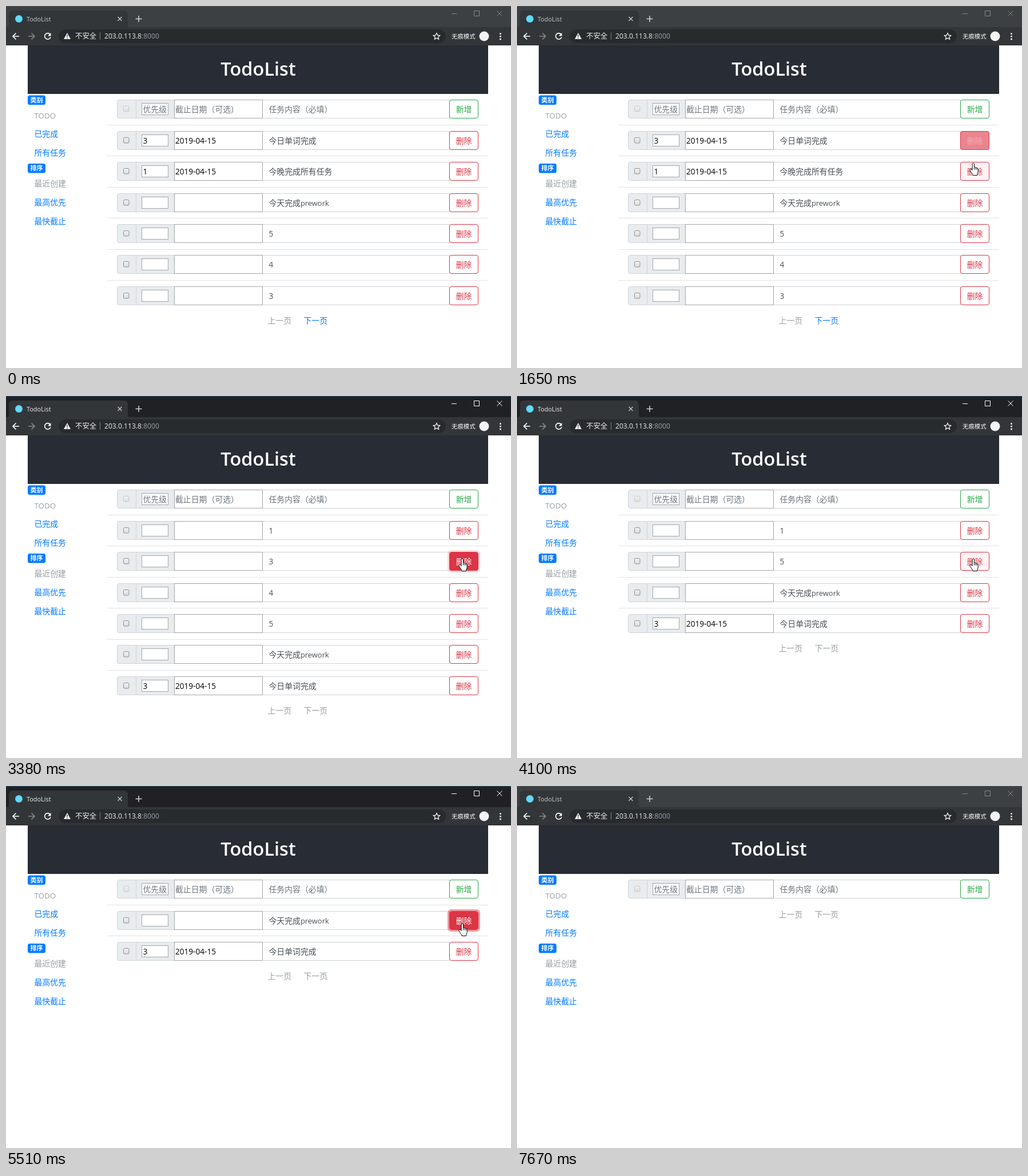
An HTML page for the animation above (7760 ms loop, 883 by 634 pixels).

```html
<!DOCTYPE html>
<html lang="zh-CN">
<head>
<meta charset="utf-8">
<title>TodoList</title>
<style>
html, body { margin: 0; width: 100%; height: 100%; overflow: hidden; background: #fff; }
svg { display: block; width: 100vw; height: 100vh; }
text { font: 13.87px "Open Sans", "Noto Sans CJK SC", "Noto Sans CJK", sans-serif; white-space: pre; }
.num { font-size: 13.6px; }
.word { font-size: 12.9px; }
.line { fill: none; stroke: #fff; }
.link { fill: #007bff; }
.off { fill: #979ea4; }
.hint { fill: #6c757d; }
.body { fill: #495057; }
.badge { font-size: 11px; font-weight: 700; fill: #fff; }
#bar { fill: #3c4043; }
#edge { fill: #4b5054; }
#tabName { font-size: 10.9px; fill: #c6c9cc; }
#controls { stroke: #85898c; }
.active #bar { fill: #202124; }
.active #edge { fill: #264a66; }
.active #tabName { fill: #eceef0; }
.active #controls { stroke: #fff; }
</style>
</head>
<body>
<svg id="stage" viewBox="0 0 883 634">
  <defs>
    <linearGradient id="box" x2="0" y2="1">
      <stop stop-color="#f3f3f3"/><stop offset="1" stop-color="#dcdcdc"/>
    </linearGradient>
  </defs>
  <rect width="883" height="634" fill="#fff"/>

  <!-- browser frame -->
  <rect id="bar" width="883" height="38"/>
  <rect id="edge" width="883" height="1"/>
  <rect y="37" width="883" height="32" fill="#323639"/>
  <path d="M0 38Q5 38 5 32V15Q5 8 12 8H206Q213 8 213 15V32Q213 38 219 38Z" fill="#323639"/>
  <circle cx="22.5" cy="22.5" r="6.5" fill="#61dafb"/>
  <text id="tabName" x="36" y="26.5">TodoList</text>
  <path class="line" d="M195.5 19l7 7m0-7l-7 7" style="stroke:#c8cbce;stroke-width:1.3"/>
  <path class="line" d="M226.5 22.5h11M232 17v11" style="stroke:#d0d3d6;stroke-width:1.5"/>
  <path id="controls" class="line" d="M779 13.5h9M818.5 8.5h9v9h-9ZM858.5 8.5l9 9m0-9l-9 9"/>
  <path class="line" d="M23 53H12m5.5-5.5L12 53l5.5 5.5" stroke-width="1.7"/>
  <path class="line" d="M39 53h11m-5.500-5.500L50 53l-5.500 5.500" style="stroke:#85898c;stroke-width:1.700"/>
  <path class="line" d="M77 49.500A5.300 5.300 0 1 0 78 54.500" stroke-width="1.700"/>
  <path d="M78.500 47v5.500H73Z" fill="#fff"/>
  <rect x="92" y="41" width="677" height="24" rx="12" fill="#282b2e"/>
  <path d="M107 47L113 58H101Z" fill="#eceef0"/>
  <path class="line" d="M107 50.500v3.500m0 1.200v1.500" style="stroke:#282b2e;stroke-width:1.300"/>
  <text x="121" y="57" fill="#eceef0" style="font-size:12.400px">不安全</text>
  <path class="line" d="M164.500 46v13" style="stroke:#7b7f83"/>
  <text x="172" y="57" fill="#eceef0" style="font-size:12.100px">203.0.113.8<tspan fill="#9aa0a6">:8000</tspan></text>
  <path class="line" d="M753 47.500l1.700 3.700 4 .4-3 2.700.9 4-3.600-2.100-3.600 2.100.9-4-3-2.700 4-.4Z" stroke-width="1.200"/>
  <text x="779" y="57" fill="#fff" style="font-size:10.400px">无痕模式</text>
  <circle cx="836" cy="53" r="8.500" fill="#f1f3f4"/>
  <path class="line" d="M864.500 48.500h0m0 4.700h0m0 4.700h0" stroke-width="3" stroke-linecap="round"/>

  <!-- page -->
  <rect x="38" y="69" width="805" height="85" fill="#282c34"/>
  <text x="441" y="122" text-anchor="middle" fill="#fff" style="font-size:32.500px;font-weight:600">TodoList</text>
  <g id="side"></g>
  <g id="list"></g>
  <g id="cursor" stroke="#000" stroke-linejoin="round">
    <path id="arrow" fill="#fff" stroke-width=".9" d="M0 0V14.500L3.400 11.300 5.800 16.600 8 15.600 5.700 10.500H10.200Z"/>
    <g id="hand">
      <path fill="#fff" d="M-1.900 2C-1.900 -.5 1.500 -.5 1.500 2V7.300C2.300 6.600 3.700 6.900 3.900 8.100C4.600 7.400 5.900 7.800 6.100 9C7 8.600 8.200 9.200 8.200 10.500V14.500C8.200 17.500 6.700 18.500 6.500 21.500H-1C-1.200 19 -3.600 17.200 -5 14.500C-6.200 12.400 -6.600 11.400 -5.800 10.800C-4.600 10 -3 10.800 -1.900 12.500Z"/>
      <path class="line" style="stroke:#000;stroke-width:.9" d="M1.500 7.500v4M3.900 8.300v3.400M6.100 9.200v2.600"/>
    </g>
  </g>
</svg>
<script>
const LOOP = 7760;
const $ = id => document.getElementById(id);
const clamp = v => Math.max(0, Math.min(1, v));
const smooth = p => p * p * (3 - 2 * p);

// bursts of picture updates: first, last, count
const BURSTS = [
  [0, 0, 1], [150, 870, 10], [960, 1650, 10], [1740, 2440, 10], [2680, 2840, 3],
  [2990, 3140, 3], [3310, 3460, 3], [3610, 3690, 2], [3850, 3940, 2],
  [4100, 4800, 10], [4880, 5510, 8], [5660, 6040, 6], [6360, 6830, 7], [7670, 7670, 1]
];

// cursor tip: time, x, y
const PATH = [
  [150, 827, 620], [870, 799, 301], [960, 799, 299], [1230, 799, 236], [1420, 799, 236],
  [1610, 798, 246], [1650, 798, 275], [1820, 798, 285], [4490, 798, 285], [4800, 798, 241],
  [5960, 798, 241], [6040, 801.5, 236.5], [6360, 801.5, 236.5], [6830, 780, 640]
];

const TASKS = {
  w: ["3", "2019-04-15", "今日单词完成"],
  a: ["1", "2019-04-15", "今晚完成所有任务"],
  p: ["", "", '今天完成<tspan class="word">prework</tspan>']
};

// time, visible rows, another page follows
const LISTS = [
  [0, "wap543", true], [2050, "12345p", true], [2990, "1345pw"], [3610, "145pw"],
  [4100, "15pw"], [4490, "1pw"], [5130, "pw"], [5660, "w"], [5960, ""]
];

// time, row
const CLICKS = [
  [1820, 2], [2680, 2], [3310, 2], [3850, 2], [4260, 2], [4880, 1], [5400, 1], [5800, 1]
];

const rowTop = i => Math.round(164.4 + 54.4 * i);
const label = (x, y, s, cls = "", more = "") => `<text x="${x}" y="${y}" class="${cls}" ${more}>${s}</text>`;
const rect = (x, y, w, h, fill, stroke, more = "") =>
  `<rect x="${x}" y="${y}" width="${w}" height="${h}" fill="${fill}" stroke="${stroke}" ${more}/>`;

function snap(t) {
  const [a, b, n] = BURSTS.filter(s => s[0] <= t).pop();
  if (n < 2) return a;
  const gap = (b - a) / (n - 1);
  return a + gap * Math.min(n - 1, Math.floor((t - a) / gap + 1e-6));
}

function pointer(t) {
  const k = PATH.findIndex(p => p[0] > t);
  if (k < 1) return null;
  const [t0, x0, y0] = PATH[k - 1], [t1, x1, y1] = PATH[k];
  const p = smooth((t - t0) / (t1 - t0));
  return { x: x0 + (x1 - x0) * p, y: y0 + (y1 - y0) * p };
}

function over(pos, row, pad = 0) {
  const top = rowTop(row);
  return !!pos && pos.x > 775 && pos.x < 826 && pos.y >= top + pad && pos.y <= top + 33 - pad;
}

// hover fades in and out over 80 ms and starts afresh with each list
function hover(row, t, since) {
  let v = 0;
  for (let s = Math.max(since, t - 400); s <= t; s += 4)
    v = clamp(v + (over(pointer(s), row, 2) ? .05 : -.05));
  return v;
}

function button(y, name, rgb, level, ring) {
  const ink = rgb.map(c => Math.round(c + (255 - c) * level));
  return (ring ? rect(773.5, y - 1.5, 54, 36, "none", `rgba(${rgb},${ring / 2})`, 'stroke-width="3" rx="5"') : "") +
    rect(775.5, y + .5, 50, 32, `rgba(${rgb},${level})`, `rgb(${rgb})`, 'rx="3.5"') +
    label(800.5, y + 22, name, "", `text-anchor="middle" fill="rgb(${ink})"`);
}

function fields(y, [prio, date, text], fresh) {
  const cls = fresh ? "hint" : "num", edge = "#a5a5a5";
  return `<path d="M294.5 ${y + .5}H198Q194.500 ${y + .5} 194.500 ${y + 4}V${y + 29}Q194.500 ${y + 32.5} 198 ${y + 32.5}H294.500Z" fill="#e9ecef" stroke="#ced4da"/>` +
    `<path d="M227.500 ${y}v33" stroke="#ced4da"/>` +
    rect(205.5, y + 11.5, 9.5, 9.5, "url(#box)", fresh ? "#c6c8ca" : "#8e8e8e", 'rx="2"') +
    rect(237.5, y + 6.5, 46, 20, "#fff", edge) +
    rect(448.5, y + .5, 327, 32, "#fff", "#ced4da") +
    rect(294.5, y + .5, 154, 32, "#fff", edge) +
    label(239.5, y + 22, prio, cls) + label(296, y + 22, date, cls) +
    label(459.5, y + 22, text, fresh ? "hint" : "body");
}

function drawList(t) {
  const [since, rows, more] = LISTS.filter(l => l[0] <= t).pop();
  const click = CLICKS.filter(c => c[0] <= t && c[0] >= since).pop();
  let out = fields(164, ["优先级", "截止日期（可选）", "任务内容（必填）"], true) +
    button(164, "新增", [40, 167, 69], 0, 0);
  [...rows].forEach((key, i) => {
    const row = i + 1, y = rowTop(row);
    const ring = click && click[1] === row ? clamp((t - click[0] + 50) / 140) : 0;
    out += `<path d="M177 ${Math.round(208 + 54.4 * i) + .5}H843" stroke="#e2e2e2"/>` +
      fields(y, TASKS[key] || ["", "", `<tspan class="num">${key}</tspan>`]) +
      button(y, "删除", [220, 53, 69], hover(row, t, since), ring);
  });
  const y = 229.6 + 54.4 * rows.length;
  return out + label(457.5, y, "上一页", "off") + label(520.5, y, "下一页", more ? "link" : "off");
}

function draw(t) {
  $("stage").classList.toggle("active", t >= 1820 && t < 7670);
  $("list").innerHTML = drawList(t);
  const pos = pointer(t);
  $("cursor").style.display = pos ? "" : "none";
  if (!pos) return;
  const count = LISTS.filter(l => l[0] <= t).pop()[1].length;
  let hand = false;
  for (let row = 1; row <= count; row++) hand = hand || over(pos, row);
  $("cursor").setAttribute("transform", `translate(${pos.x} ${pos.y})`);
  $("hand").style.display = hand ? "" : "none";
  $("arrow").style.display = hand ? "none" : "";
}

const badge = (y, s) => rect(38, y, 31, 16.5, "#007bff", "none", 'rx="3.5"') + label(42.5, y + 12.2, s, "badge");
$("side").innerHTML = badge(156.5, "类别") + badge(276, "排序") +
  label(49.5, 196.5, "TODO", "off", 'style="font-size:13.300px"') +
  label(49.5, 229.3, "已完成", "link") + label(49.5, 262.2, "所有任务", "link") +
  label(49.5, 316, "最近创建", "off") + label(49.5, 348.8, "最高优先", "link") +
  label(49.5, 381.7, "最快截止", "link");

const start = performance.now();
let last = -1;
function tick() {
  const t = snap((performance.now() - start) % LOOP);
  if (t !== last) draw(last = t);
  requestAnimationFrame(tick);
}
tick();
</script>
</body>
</html>
```
